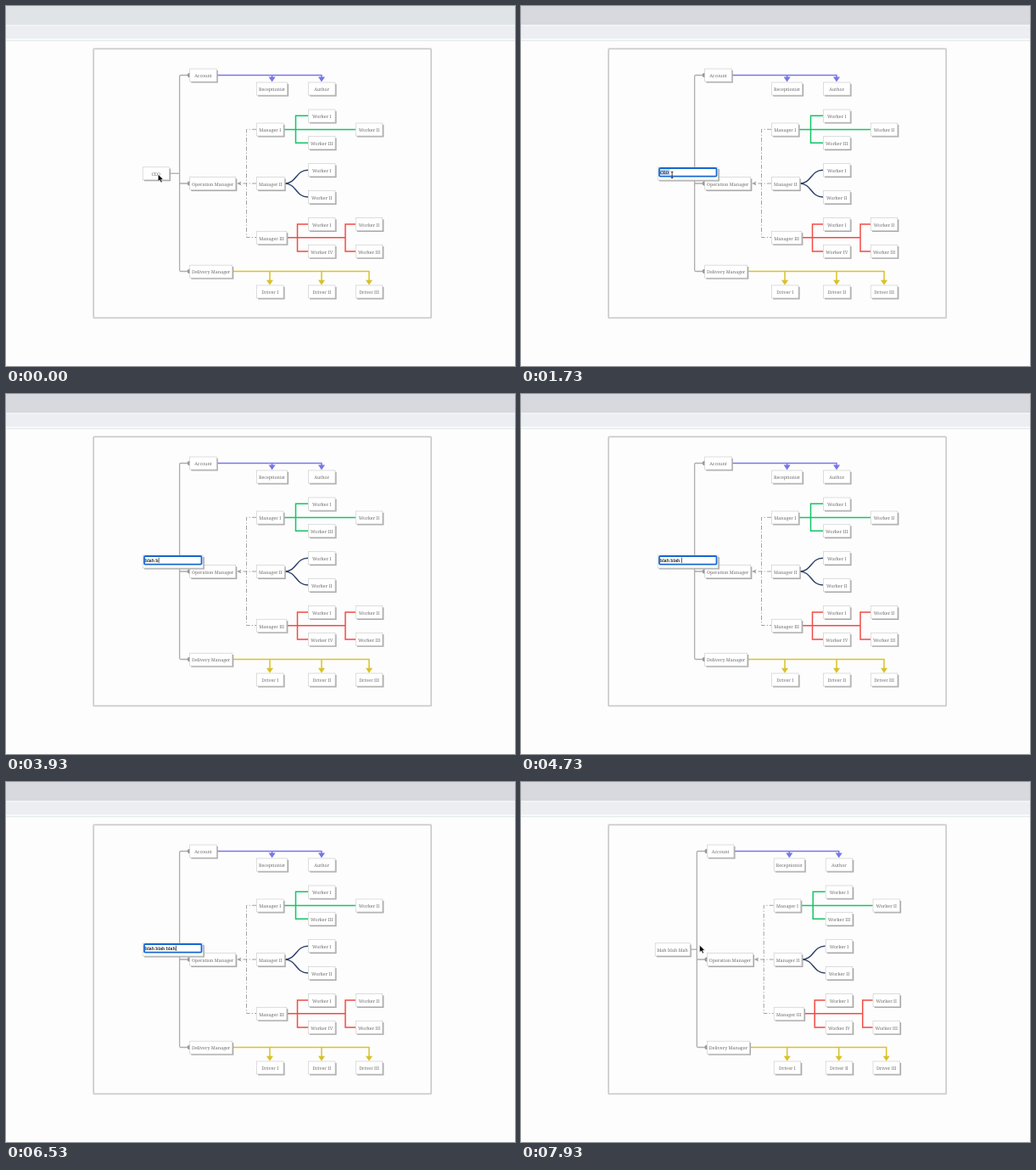
Recreate the animation shown at these times as an HTML page. Size 600x424 px, loop 8000 ms.

```html
<!DOCTYPE html>
<html lang="en">
<head>
<meta charset="utf-8">
<title>Editable organisation chart</title>
<style>
  html, body { margin: 0; width: 100%; height: 100%; overflow: hidden; background: #fdfdfd; }
  svg { display: block; width: 600px; height: 424px; }
  text { font: 5.3px "Noto Serif", serif; fill: #6c6c6c; text-anchor: middle; text-rendering: geometricPrecision; white-space: pre; }
  .edit text { font-size: 5.2px; fill: #111; stroke: #111; stroke-width: .1; text-anchor: start; }
  path { fill: none; stroke-width: 1.5; }
  .trunk { stroke: #adadad; stroke-width: 1.3; }
  .thin { stroke: #a2a2a2; stroke-width: 1; }
</style>
</head>
<body>
<svg viewBox="0 0 600 424">
  <rect width="600" height="424" fill="#fdfdfd"/>
  <rect id="bar" width="600" height="22"/>
  <rect y="22" width="600" height="1.5" fill="#f3f4f6"/>
  <rect y="23.5" width="600" height="15" fill="#eceef2"/>
  <rect y="40.3" width="600" height="1" fill="#dce3e8"/>
  <rect x="103.2" y="50.4" width="398" height="317" rx="1" fill="#fdfdfd" stroke="#cbcbcb" stroke-width="1.7"/>
  <g id="chart"></g>
  <path id="rootLine" class="trunk"/>
  <g id="root"></g>
  <g id="editor" class="edit">
    <rect x="162.9" y="192" width="71" height="14.5" fill="#aaa"/>
    <rect x="161.2" y="190" width="71" height="15" fill="#fff" stroke="#d0d0d0" stroke-width=".7"/>
    <rect x="163" y="191" width="67.5" height="9.6" rx="1.2" fill="#fff" stroke="#1768d2" stroke-width="1.8"/>
    <rect id="selection" x="164" y="192.4" width="11.5" height="6.8" fill="#b9d3f0"/>
    <text id="typed" x="164" y="197.6"></text>
    <rect id="caret" y="192.7" width=".7" height="6.2" fill="#111"/>
  </g>
  <path id="beam" d="M176.8 195.4h2.6M178.1 195.4v7.2M176.8 202.6h2.6" stroke="#222" style="stroke-width:.9"/>
  <path id="pointer" d="M0 0V8.3L2 6.5L3.4 9.6L4.8 9L3.5 6H6.1Z" style="fill:#000;stroke:#fff;stroke-width:.5"/>
</svg>
<script>
const LOOP = 8000, EDIT = 1000, TYPE = 2930, KEY = 200, COMMIT = 6600, SETTLE = 550, POINT = 7250;
const MESSAGE = 'blah blah blah';
const el = id => document.getElementById(id);

const box = (label, x, y, w = 31.5) => `
  <rect x="${x + 1.6}" y="${y + 1.8}" width="${w}" height="14.7" fill="#a9a9a9"/>
  <rect x="${x}" y="${y}" width="${w}" height="15" fill="#fff" stroke="#cfcfcf" stroke-width=".7"/>
  <text x="${x + w / 2}" y="${y + 10.2}">${label}</text>`;

const line = (d, color) => `<path d="${d}" stroke="${color}"/>`;
const arrows = (xs, y, color) => xs.map(x =>
  `<path d="M${x - 4} ${y - 5.5}h8l-4 6z" style="fill:${color};stroke:none"/>`).join('');
const dot = y => `<circle cx="216.5" cy="${y}" r="2.7" fill="#999"/>`;

const PURPLE = '#7777ea', GREEN = '#12c566', NAVY = '#2e4068', RED = '#f24b45', YELLOW = '#d9c22a';

el('chart').innerHTML = `
  <path class="trunk" d="M216 81.5H206Q204.6 81.5 204.6 83V311Q204.6 312.5 206 312.5H216M204.6 209H216"/>
  ${[81.5, 209, 312.5].map(dot).join('')}
  <path class="thin" stroke-dasharray="5 2.2 1.2 2.2" d="M295 145.3H283.5V272.5H295M295 209H274"/>
  <path d="M272 209l5.5-2.6-1.5 2.6 1.5 2.6z" style="fill:#a2a2a2;stroke:none"/>`
  + line('M248 81.5H372V86M313.6 81.5V86', PURPLE) + arrows([313.6, 372], 89, PURPLE)
  + line('M327 145.4H412M356 129.3H341.5V161.3H356', GREEN)
  + line('M328 209C343 209 341 193.3 356 193.3M328 209C343 209 341 225 356 225', NAVY)
  + line('M331 272.7H400M356 257H343.5V289H356M412 257H400V289H412', RED)
  + line('M267 312.6H428V325M311 312.6V325M372 312.6V325', YELLOW) + arrows([311, 372, 428], 328.3, YELLOW)
  + [
    ['Account', 216.7, 74], ['Receptionist', 295.5, 90, 36], ['Author', 356.5, 90],
    ['Worker I', 356.5, 122], ['Manager I', 295.5, 138], ['Worker II', 412.3, 138], ['Worker III', 356.5, 153.7],
    ['Worker I', 356.5, 185.7], ['Manager II', 295.5, 201.6, 32.7], ['Worker II', 356.5, 217.5],
    ['Worker I', 356.5, 249.5], ['Worker II', 412.3, 249.5], ['Manager III', 295.5, 265.3, 35.3],
    ['Worker IV', 356.5, 281.3], ['Worker III', 412.3, 281.3],
    ['Operation Manager', 216.7, 201.6, 54], ['Delivery Manager', 216.7, 305.2, 50],
    ['Driver I', 295.5, 329], ['Driver II', 356.5, 329], ['Driver III', 412.3, 329]
  ].map(node => box(...node)).join('');

const show = (id, visible) => el(id).style.display = visible ? '' : 'none';
const progress = (t, start, length) => Math.min(1, Math.max(0, (t - start) / length));
let rootLabel;

function draw(t) {
  const editing = t >= EDIT && t < COMMIT, typing = editing && t >= TYPE, done = t >= COMMIT;
  const settle = 1 - (1 - progress(t, COMMIT, SETTLE)) ** 2;
  const shift = 2.7 * settle, rootShift = -3 * settle;

  el('bar').setAttribute('fill', t < 60 ? '#e0e4e7' : '#d8d9de');
  el('chart').setAttribute('transform', `translate(${shift} 0)`);

  const label = done ? MESSAGE : 'CEO', width = done ? 41 : 31.2;
  if (label !== rootLabel) {
    el('root').innerHTML = box(label, 161.2, 189.8, width);
    rootLabel = label;
  }
  el('root').setAttribute('transform', `translate(${rootShift} 0)`);
  const rootText = el('root').querySelector('text');
  rootText.style.fill = done && t < POINT ? '#444' : '';
  el('rootLine').setAttribute('d', `M${161.2 + width + rootShift} 197.2H${204.6 + shift}`);
  show('root', !editing);
  show('rootLine', !editing);
  show('editor', editing);
  show('selection', editing && !typing);
  show('beam', editing && !typing);

  if (editing) {
    const typed = el('typed');
    const text = typing ? MESSAGE.slice(0, 1 + Math.floor((t - TYPE) / KEY)) : 'CEO';
    // A no-break space keeps its advance at the end of the line.
    typed.textContent = text.replace(/ /g, '\u00a0');
    el('caret').setAttribute('x', 164.2 + typed.getComputedTextLength());
    const idle = t - TYPE - KEY * MESSAGE.length;
    show('caret', typing && (idle < 0 || idle % 1000 < 500 || t > 6400));
  }

  const move = progress(t, POINT, 500), glide = move * move * (3 - 2 * move);
  show('pointer', t < EDIT || t >= POINT);
  el('pointer').setAttribute('transform', done
    ? `translate(${179.3 + 31.3 * glide} ${198.3 - 6 * glide})` : 'translate(179.3 198.3)');
}

function tick() {
  draw(performance.now() % LOOP);
  requestAnimationFrame(tick);
}
tick();
</script>
</body>
</html>
```
